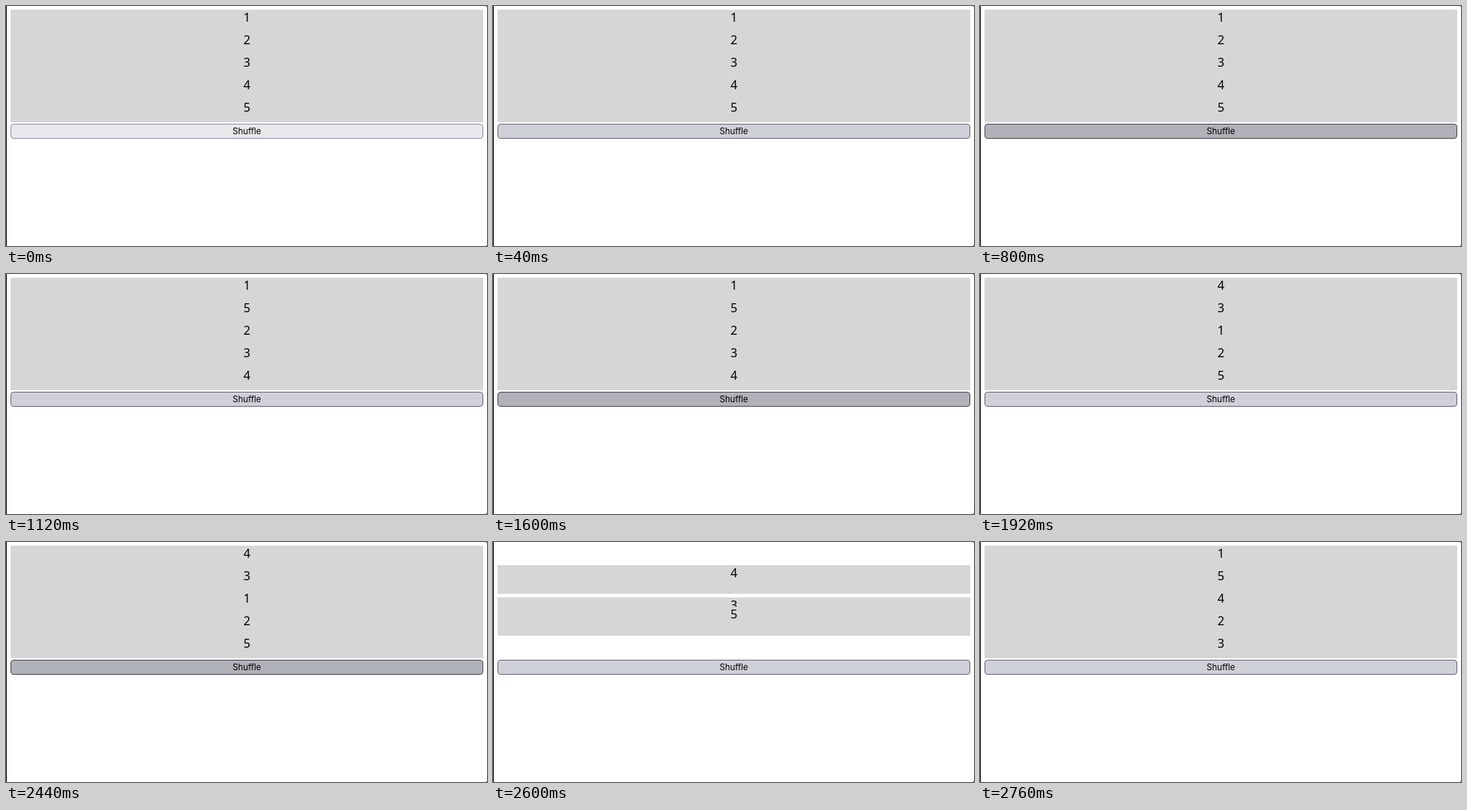
An HTML page for the animation above (2.84 s loop, 640 by 320 pixels).

```html
<!DOCTYPE html>
<html lang="en">
<head>
<meta charset="utf-8">
<title>Shuffle</title>
<style>
  html, body { margin: 0; width: 100%; height: 100%; overflow: hidden; background: #fff; }
  svg { display: block; width: 640px; height: 320px; }
  text { text-anchor: middle; fill: #000; }
  .row rect { fill: #d6d6d6; }
  .row text { font: 16px "Noto Sans", "Open Sans", sans-serif; }
  #label { font: 11.3px Inter, sans-serif; }
</style>
</head>
<body>
<svg viewBox="0 0 640 320">
  <rect width="1" height="320"/>
  <path d="M639 0h1v1h-1zM639 319h1v1h-1z" fill="#555"/>
  <g id="list"></g>
  <rect id="button" x="6.5" y="157.5" width="628" height="19" rx="3.5"/>
  <text id="label" x="320.5" y="171">Shuffle</text>
</svg>
<script>
const LOOP = 2840, STEP = 40, MOVE = 250, ROW = 30, TOP = 5;

const orders = ["12345", "15234", "43125", "15423"];
const starts = [845, 1662, 2485];

const looks = {
  idle: ["#e9e9ed", "#8f8f9d"],
  hover: ["#d0d0d9", "#676774"],
  active: ["#b1b1b9", "#484851"]
};
const states = [
  [0, "idle"], [40, "hover"],
  [800, "active"], [840, "hover"],
  [1600, "active"], [1680, "hover"],
  [2440, "active"], [2480, "hover"]
];

const list = document.getElementById("list");
const button = document.getElementById("button");

function make(tag, parent, attrs) {
  const el = document.createElementNS("http://www.w3.org/2000/svg", tag);
  for (const name in attrs) el.setAttribute(name, attrs[name]);
  return parent.appendChild(el);
}

// Later numbers paint above earlier ones while rows cross.
const rows = [...orders[0]].map(digit => {
  const g = make("g", list, { class: "row" });
  make("rect", g, { x: 6, width: 629, height: ROW });
  make("text", g, { x: 320.5, y: 16 }).textContent = digit;
  return { digit, g };
});

// cubic-bezier(.42, 0, .58, 1), solved for x by bisection
function easeInOut(x) {
  let lo = 0, hi = 1, u = x;
  for (let i = 0; i < 20; i++) {
    u = (lo + hi) / 2;
    const bx = 1.26 * u * (1 - u) ** 2 + 1.74 * u * u * (1 - u) + u ** 3;
    if (bx < x) lo = u; else hi = u;
  }
  return u * u * (3 - 2 * u);
}

function progress(t, start) {
  const x = (t - start) / MOVE;
  return x <= 0 ? 0 : x >= 1 ? 1 : easeInOut(x);
}

function draw(t) {
  const amounts = starts.map(start => progress(t, start));
  for (const { digit, g } of rows) {
    const slots = orders.map(order => order.indexOf(digit));
    const slot = amounts.reduce((pos, p, i) => pos + p * (slots[i + 1] - slots[i]), slots[0]);
    g.setAttribute("transform", `translate(0 ${TOP + ROW * slot})`);
  }
  const [, state] = states.filter(([at]) => at <= t).pop();
  const [fill, stroke] = looks[state];
  button.setAttribute("fill", fill);
  button.setAttribute("stroke", stroke);
}

const begin = performance.now();
function tick() {
  const t = Math.max(0, performance.now() - begin) % LOOP;
  draw(Math.floor(t / STEP) * STEP);
  requestAnimationFrame(tick);
}
tick();
</script>
</body>
</html>
```
